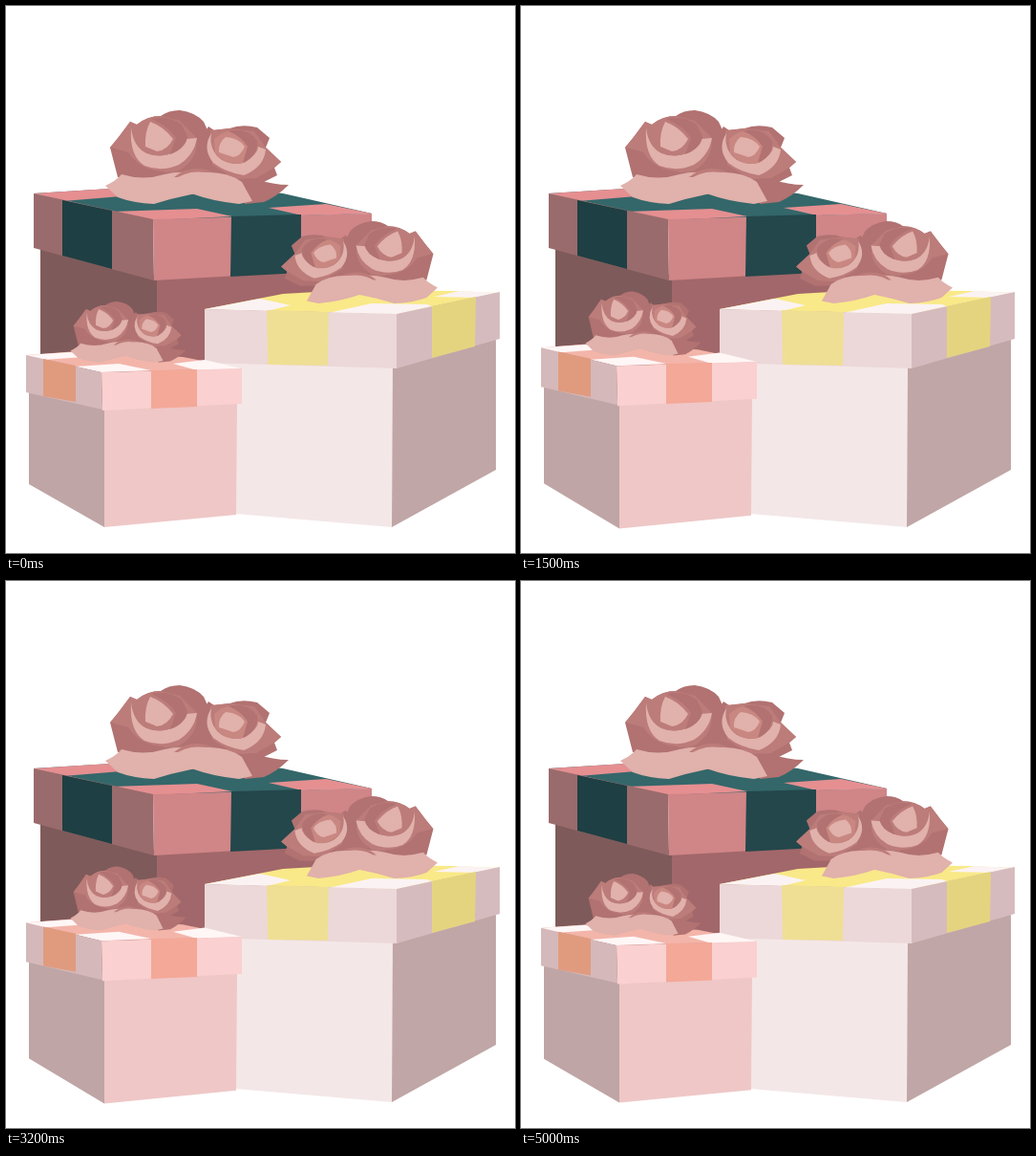
Animation of 533 by 572 pixels, one loop 5.11 s. Source, as an HTML page with a canvas:

```html
<!DOCTYPE html>
<html lang="en">
<head>
<meta charset="utf-8">
<title>Gift boxes</title>
<style>
html, body { margin: 0; width: 100%; height: 100%; overflow: hidden; background: #fff; }
canvas { display: block; }
</style>
</head>
<body>
<canvas id="stage" width="533" height="572"></canvas>
<script>
const ctx = document.getElementById('stage').getContext('2d');
const LOOP = 5110, STEP = 100, LAST_STEP = 50;
const CYCLE = 1700, RISE = 660, STRETCH = 0.222;

const dark = '#b17271', mid = '#bc7c79', warm = '#c98782', light = '#e1b1ab';

// Each layer is [colour, path]; later layers lie on top.
const layers = list => list.map(([color, d]) => [color, new Path2D(d)]);

const sideLeaf = layers([
  [dark, 'M246 184L262 181Q280 187 296 187Q284 199 270 205L250 207Z'],
]);

const roses = layers([
  // left bloom
  [dark, 'M109 148L118 137L130 121L137 124Q148 115 162 115Q170 109 182 109Q198 111 207 121L212 132L214 165L195 180L160 184L117 179Z'],
  [mid, 'M130 121L137 124Q148 115 162 115L182 120L199 137Q203 160 180 173Q150 178 130 160L109 148L118 137Z'],
  [dark, 'M110 148L128 153Q140 172 166 173L150 181L118 179Z'],
  [light, 'M131 127Q133 147 147 154Q162 160 177 152Q188 145 189 139L200 138Q197 156 181 166Q163 174 145 167Q129 157 131 127Z'],
  [mid, 'M137 130Q141 118 158 117Q178 118 187 132Q188 146 174 154Q158 160 143 151Q134 142 137 130Z'],
  [dark, 'M152 118Q169 114 184 124L190 137Q188 149 172 155L178 138Q171 126 152 118Z'],
  [light, 'M151 121Q165 126 175 139Q169 151 158 152L146 147Q145 132 151 121Z'],
  // right bloom
  [dark, 'M203 140L212 126L218 130L234 128Q247 123 263 127L276 138L272 148L288 163L281 169L284 177L266 186L244 186L201 172Z'],
  [mid, 'M214 130L234 128L260 131L272 148L288 163L281 169L262 180L240 181L216 166Z'],
  [light, 'M215 133Q212 151 226 161Q239 168 251 163Q264 154 264 147L272 150Q270 169 249 177Q230 174 217 164Q205 149 215 133Z'],
  [warm, 'M218 139Q228 129 243 131Q258 134 262 147Q260 160 245 165Q228 166 219 153Z'],
  [dark, 'M233 131Q252 126 263 141Q264 157 248 164L253 147Q246 136 233 131Z'],
  [light, 'M230 137Q244 138 250 147Q246 157 238 158L223 153Q222 143 230 137Z'],
  // lower petals
  [light, 'M104 188Q115 183 121 176Q144 183 166 176Q182 172 197 175L212 195L194 197Q174 201 155 207Q133 206 117 200Z'],
  [mid, 'M176 179Q190 167 209 171L226 177L211 186L194 179Z'],
  [light, 'M174 183Q189 171 209 174Q232 173 247 184L258 204L244 207Q216 204 197 197Z'],
]);

const bigBox = layers([
  ['#7f5a5a', 'M36 250L159 282V480H36Z'],
  ['#a2676a', 'M158 284L375 272V480H158Z'],
  ['#34676a', 'M29 196L110 191L200 186L290 196L383 217L154 224Z'],
  ['#e58f91', 'M29 196L108 191L133 198L60 204Z'],
  ['#e58f91', 'M111 215L200 212L237 220L154 224Z'],
  ['#e58f91', 'M275 211L335 207L383 217L310 219Z'],
  ['#9a6b6c', 'M29 196L154 223L155 287L29 253Z'],
  ['#1e3f43', 'M59 203L111 214V275L59 261Z'],
  ['#d08587', 'M154 223L383 217V274L155 287Z'],
  ['#24474b', 'M236 220L309 218V279L235 283Z'],
]);

const paleBox = layers([
  ['#f4e7e7', 'M217 370L406 376L404 545L217 529Z'],
  ['#c0a6a6', 'M405 375L513 346V485L404 545Z'],
  ['#f9e988', 'M208 317L290 301L360 297L470 298L517 300L409 322Z'],
  ['#fbf3f3', 'M208 317L266 306L298 313L273 319Z'],
  ['#fbf3f3', 'M337 321L383 311L441 312L446 314L409 322Z'],
  ['#fbf3f3', 'M448 304L475 298L517 300L492 305Z'],
  ['#ecd8d9', 'M208 317L410 322V379L208 373Z'],
  ['#efdf95', 'M273 318L338 320L337 376L274 375Z'],
  ['#d6bbbe', 'M409 322L517 299V348L409 379Z'],
  ['#e5d47f', 'M446 314L492 304L491 356L446 368Z'],
]);

const smallBox = layers([
  ['#bfa5a5', 'M24 400L104 418L103 545L24 500Z'],
  ['#efc7c7', 'M103 419L242 412L241 532L103 545Z'],
  ['#f3b5aa', 'M21 365L75 361L185 367L247 379L100 383Z'],
  ['#fff6f6', 'M21 365L68 362L82 367L39 370Z'],
  ['#fff6f6', 'M73 377L118 374L152 381L100 383Z'],
  ['#fff6f6', 'M175 374L208 370L247 379L200 381Z'],
  ['#d5b8ba', 'M21 365L100 383L101 422L21 404Z'],
  ['#e09b7f', 'M39 369L73 376V414L39 408Z'],
  ['#fad0d0', 'M100 383L247 379V416L101 423Z'],
  ['#f4a897', 'M152 381L200 380V419L152 421Z'],
]);

function paint(shapes) {
  for (const [color, path] of shapes) {
    ctx.fillStyle = color;
    ctx.fill(path);
  }
}

// Centres the pair of roses on x, y; a negative width mirrors them.
function bouquet(x, y, sx, sy, withLeaf) {
  ctx.save();
  ctx.translate(x, y);
  ctx.scale(sx, sy);
  ctx.translate(-200, -158);
  if (withLeaf) paint(sideLeaf);
  paint(roses);
  ctx.restore();
}

const gifts = [
  { box: bigBox, flower: [200, 158, 1, 1, true], delay: 0, base: 456 },
  { box: paleBox, flower: [366.5, 268, -0.89, 0.88, false], delay: 175, base: 527 },
  { box: smallBox, flower: [128, 341, 0.63, 0.65, true], delay: 390, base: 517 },
];

// Eased rise and fall, followed by a rest until the cycle ends.
function stretchAt(time, delay) {
  const t = ((time - delay) % CYCLE + CYCLE) % CYCLE;
  const lift = t < 2 * RISE ? (1 - Math.cos(Math.PI * t / RISE)) / 2 : 0;
  return 1 + STRETCH * lift;
}

function draw(time) {
  ctx.fillStyle = '#fff';
  ctx.fillRect(0, 0, 533, 572);
  for (const { box, flower, delay, base } of gifts) {
    ctx.save();
    ctx.translate(0, base);
    ctx.scale(1, stretchAt(time, delay));
    ctx.translate(0, -base);
    paint(box);
    bouquet(...flower);
    ctx.restore();
  }
}

const start = performance.now();
function tick() {
  const elapsed = (performance.now() - start) % LOOP;
  draw(Math.min(LAST_STEP, Math.floor(elapsed / STEP)) * STEP);
  requestAnimationFrame(tick);
}
tick();
</script>
</body>
</html>
```
